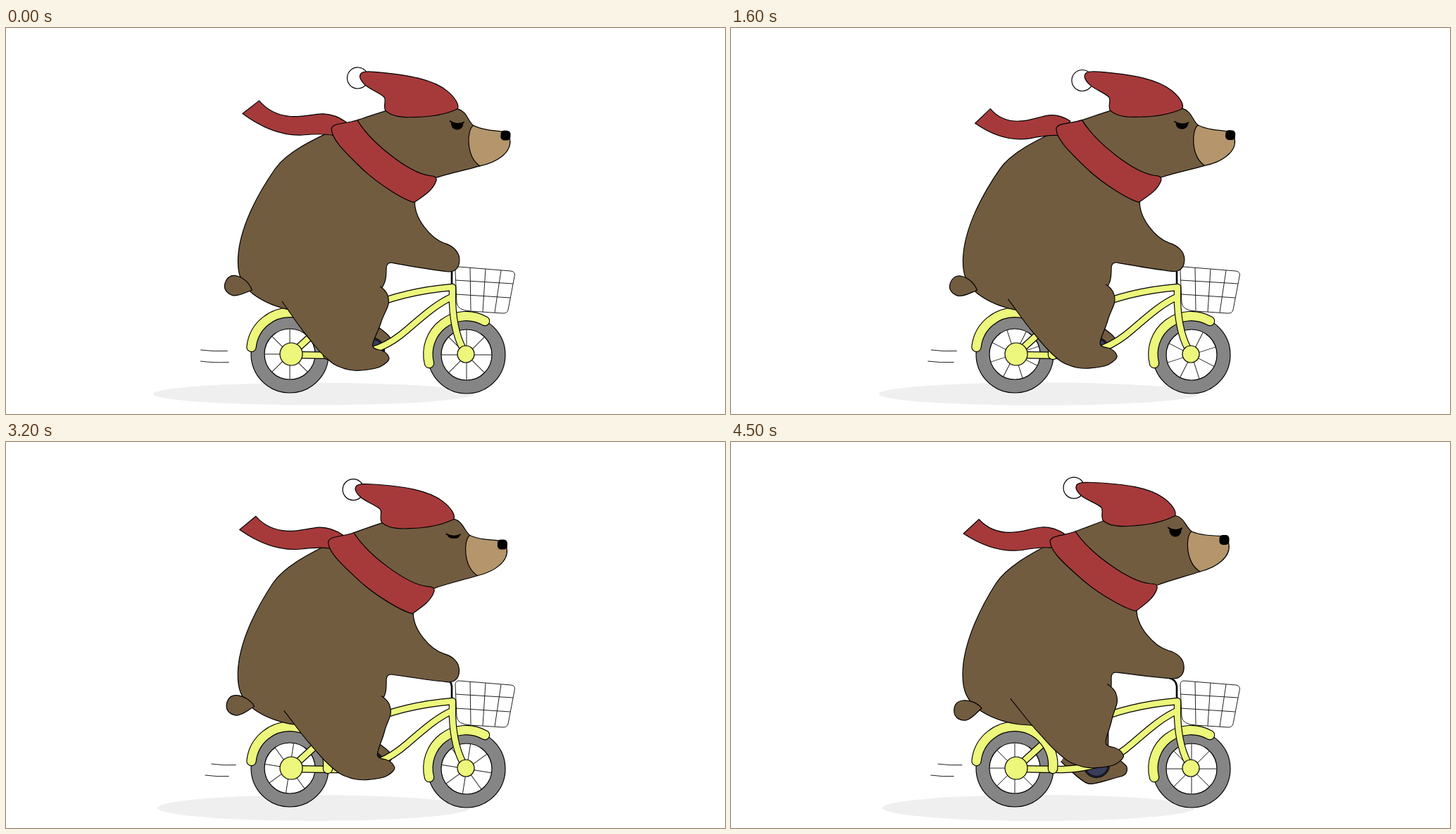
These frames come from a looping animation (1021 px wide and 548 px high, 4.6 s). An HTML page:

```html
<!DOCTYPE html>
<html lang="en">
<head>
<meta charset="utf-8">
<title>Bear on a bicycle</title>
<style>
  html, body { margin: 0; width: 100%; height: 100%; overflow: hidden; background: #fff; }
  svg { display: block; width: 100%; height: 100%; }
  .ink { stroke: #000; stroke-width: 1.2; stroke-linejoin: round; }
  .fur { fill: #725c40; }
  .wool { fill: #a63a3b; }
  .yellow { fill: #ecf77b; }
  .thin { fill: none; stroke: #222; stroke-width: 1; }
  .edge, .paint { fill: none; stroke-linecap: round; stroke-linejoin: round; }
  .edge { stroke: #000; }
  .paint { stroke: #ecf77b; }
</style>
</head>
<body>
<svg viewBox="0 0 1021 548">
  <defs>
    <g id="wheel">
      <circle class="ink" r="55" fill="#858585"/>
      <circle class="ink" r="36" fill="#fff"/>
      <path id="spokes" class="thin" d="M-36 0H36M0-36V36M-25.5-25.5 25.5 25.5M-25.5 25.5 25.5-25.5"/>
    </g>
    <path id="tubes" d="M405 463 450 422M405 464 470 465C520 463 545 450 570 428C600 402 615 390 633 382M500 402Q560 374 634 368V390Q636 437 653 462"/>
    <path id="rearFender" d="M348.5 453A54 54 0 0 1 457 464"/>
    <path id="frontFender" d="M601 476A54 54 0 0 1 680 416"/>
  </defs>

  <ellipse id="shadow" cx="437" cy="519.5" fill="#efefef"/>
  <path id="speed" class="thin"/>
  <path class="thin" d="M643 339 717 345Q724 346 722 353L713 400Q712 405 706 405L660 402Q641 401 640 390L638 345Q638 339 643 339M659 340 660 401M681 342 677 403M703 344 694 404M638 358 720 363M639 378 716 383"/>
  <use href="#wheel" x="403" y="463"/>
  <use href="#wheel" x="654" y="464"/>
  <path id="farLeg" class="ink fur" d="M535 340C533 370 535 400 532 432C540 437 552 444 558 452C560 460 556 464 551 466C536 469 518 477 505 477C496 477 476 456 465 445"/>
  <circle cx="519" cy="458" r="17.5" fill="#3a3d59" stroke="#17191f" stroke-width="3.5"/>

  <use href="#frontFender" class="edge" stroke-width="14.5"/>
  <use href="#frontFender" class="paint" stroke-width="12.2"/>
  <use href="#tubes" class="edge" stroke-width="10.5"/>
  <use href="#tubes" class="paint" stroke-width="8.2"/>
  <use href="#rearFender" class="edge" stroke-width="14.5"/>
  <use href="#rearFender" class="paint" stroke-width="12.2"/>
  <circle class="ink yellow" cx="405" cy="463" r="16"/>
  <circle class="ink yellow" cx="653" cy="463" r="12"/>
  <path d="M633 364V347Q632 337 622 335" fill="none" stroke="#000" stroke-width="2.6"/>

  <g id="bear">
    <path class="ink fur" d="M470 135C440 152 395 172 376 201C350 242 329 290 329 330C329 352 334 366 352 380C368 391 387 398 410 401C450 405 512 402 530 370C542 356 540 346 540 335Q540 327 547 327C570 330 600 334 628 336C640 336 644 327 643 317C642 307 633 299 621 296C601 290 576 263 576 238Z"/>
    <path id="tail" class="ink fur" d="M356 378C350 370 338 366 329 367C319 368 316 376 317 384C318 392 326 396 334 395C342 393 348 385 356 378Z"/>
    <path class="ink fur" d="M489 127C505 121 520 115 535 110L630 104C645 108 645 120 654 127L666 184C645 191 624 196 606 203C570 207 510 160 489 127Z"/>
    <path class="ink" fill="#b4956c" d="M654 127C645 133 645 171 666 184C690 178 710 163 707 145L704 134C685 133 668 133 654 127Z"/>
    <rect x="693.5" y="132" width="14" height="14" rx="5"/>
    <path id="pupil"/>
    <path id="brow" fill="none" stroke="#000" stroke-width="1.8"/>
    <path id="streamer" class="ink wool" d="M347 104C358 116 372 124 393 125C412 126 422 121 440 120C455 120 465 125 474 131L456 150C444 148 428 149 411 151C380 153 352 142 324 123Z"/>
    <circle id="pom" class="ink" cx="487" r="15" fill="#fff"/>
    <path class="ink wool" d="M453 141C455 132 470 134 489 127C510 158 565 198 595 201C603 201 606 203 605 208C601 221 590 229 575 240C560 237 520 215 495 192C470 170 454 155 453 141Z"/>
    <path class="ink wool" d="M490 66C489 58 497 57 510 57.5C560 59 595 65 615 80C627 89 634 100 630 105C610 115 590 118 570 119C550 121 535 118 528 111C525 104 529 98 526 93C518 85 495 81 490 66Z"/>
  </g>
  <path id="nearLeg" class="ink fur" d="M391 378C402 393 412 410 425 426C437 441 441 448 453 458.5C460 465 464 469 474 472C484 476 492 477 503 476C513 475 523 474 529 471C537 467 544 461 541.5 457C540 453 537 450 533 448.5C529 446 519 447 519 441C518 436 527 421 531 409C537 391 545 385 542 372C541 364 535 360 531 357"/>
</svg>

<script>
const LOOP = 4600, STEP = 100;
const set = (id, attrs) => {
  for (const name in attrs) document.getElementById(id).setAttribute(name, attrs[name]);
};

// Swings between 0 and 1, reaching 1 at the peak time.
const wave = (t, period, peak) => (1 + Math.cos(2 * Math.PI * (t - peak) / period)) / 2;

// Moves the foot by (dx, dy); the sideways part fades out towards the hip.
function swingLeg(id, dx, dy) {
  const hipY = 330, length = 130, shear = dx / length;
  set(id, { transform: `matrix(1 0 ${shear} 1 ${-shear * hipY} ${dy})` });
}

function drawLegs(t) {
  const angle = Math.PI / 2 * (1 + t * .0024);
  const cos = Math.cos(angle), sin = Math.sin(angle);
  swingLeg("nearLeg", 17 * cos + 2 * sin, 10 * sin - 11 * cos);
  swingLeg("farLeg", -13 * sin, 5 * cos - 12 * sin);
}

function drawBear(t) {
  // The body rocks two and a half times, then sits still.
  const rock = 1370, start = 100;
  const lean = t < start + 2.5 * rock ? .88 * wave(t, rock, start) : 0;
  set("bear", { transform: `rotate(${lean * 3.17} 412 340)` });
  set("tail", { transform: `rotate(${lean * 23} 362 361)` });
  set("pom", { cy: 65 + 6 * wave(t, 1200, 2750) });

  // The scarf bends in proportion to the distance from its knot.
  const flap = .1 + .9 * wave(t, 3400, 2000) ** 1.5;
  const knotX = 460, bendX = 15 * flap / 125, bendY = 17 * flap / 125;
  set("streamer", { transform: `matrix(${1 - bendX} ${-bendY} 0 1 ${bendX * knotX} ${bendY * knotX})` });

  const open = wave(t, 2500, 2150);
  const lid = 126 - 4 * open, bottom = 133.5 + 5 * open;
  set("brow", { d: `M620 ${lid - open}Q631 ${lid + 6} 641 ${lid}` });
  set("pupil", { d: `M622.5 ${lid + 1}Q631 ${lid + 5} 639.5 ${lid + 1}C641 ${bottom} 621 ${bottom} 622.5 ${lid + 1}Z` });
}

function drawRoad(t) {
  const spread = wave(t, 1250, 2000);
  set("shadow", { rx: 229 - 7 * spread, ry: 15.5 + 3 * spread });

  const gust = wave(t, 1760, 1180);
  const upper = 269 + 28 * gust, upperEnd = 309 + 22 * gust, lower = 273 + 12 * gust;
  set("speed", { d: `M${upper} 457Q${upper + 18} 459.5 ${upperEnd} 458.5M${lower} 473Q${lower + 18} 475.5 316.5 474.5` });

  set("spokes", { transform: `rotate(${(t - 4500) * .27})` });
}

const begin = performance.now();
function tick() {
  const elapsed = (performance.now() - begin) % LOOP;
  const t = Math.floor(elapsed / STEP) * STEP;
  drawRoad(t);
  drawLegs(t);
  drawBear(t);
  requestAnimationFrame(tick);
}
tick();
</script>
</body>
</html>
```
